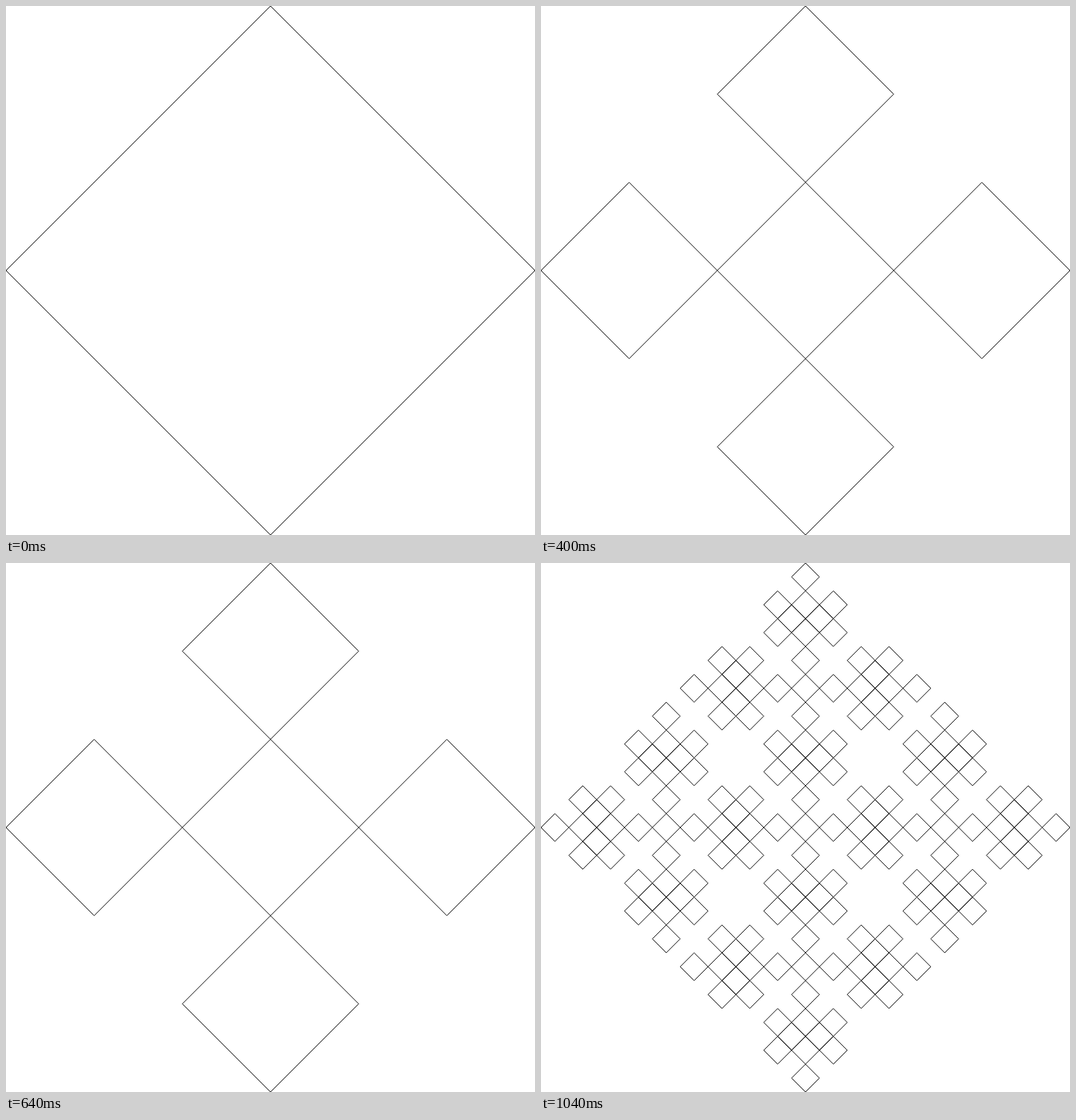
An HTML page that plays this animation: 748 px wide and 748 px high, repeating every 1200 ms.

```html
<!DOCTYPE html>
<html lang="en">
<head>
<meta charset="utf-8">
<title>Diamond curve</title>
<style>
  html, body { margin: 0; width: 100%; height: 100%; overflow: hidden; background: #fff; }
  svg { display: block; width: 100%; height: 100%; }
  path { fill: none; stroke: #000; stroke-width: 1; vector-effect: non-scaling-stroke; }
</style>
</head>
<body>
<svg viewBox="-19 -19 38 38"><path id="curve"/></svg>
<script>
const STEP_MS = 400;
const HALF = 19;

const diamond = (x, y, r = 1) =>
  `M${x - r} ${y}L${x} ${y - r}L${x + r} ${y}L${x} ${y + r}Z`;

// Centre point plus its four neighbours at distance d
const cross = d => [[0, 0], [0, -d], [d, 0], [0, d], [-d, 0]];

// Ten small diamonds; the long axis is vertical unless turned
const CLUSTER = [
  [0, -3], [0, 3], [-2, -1], [2, -1], [-2, 1], [2, 1],
  [0, -1], [0, 1], [-1, 0], [1, 0]
];
const cluster = (cx, cy, turned) => CLUSTER.map(([a, b]) =>
  turned ? diamond(cx + b, cy + a) : diamond(cx + a, cy + b)).join("");

function fineCurve() {
  const parts = new Set();
  for (const [x, y] of cross(10)) {
    parts.add(diamond(x, y));
    for (const side of [-5, 5]) {
      parts.add(cluster(x, y + side, false));
      parts.add(cluster(x + side, y, true));
    }
  }
  return [...parts].join("");
}

const third = HALF / 3;
const stages = [
  diamond(0, 0, HALF),
  cross(2 * third).map(([x, y]) => diamond(x, y, third)).join(""),
  fineCurve()
];

const curve = document.getElementById("curve");
const start = performance.now();
let shown = -1;

function draw() {
  const stage = Math.floor((performance.now() - start) / STEP_MS) % stages.length;
  if (stage !== shown) {
    curve.setAttribute("d", stages[stage]);
    shown = stage;
  }
  requestAnimationFrame(draw);
}
draw();
</script>
</body>
</html>
```
